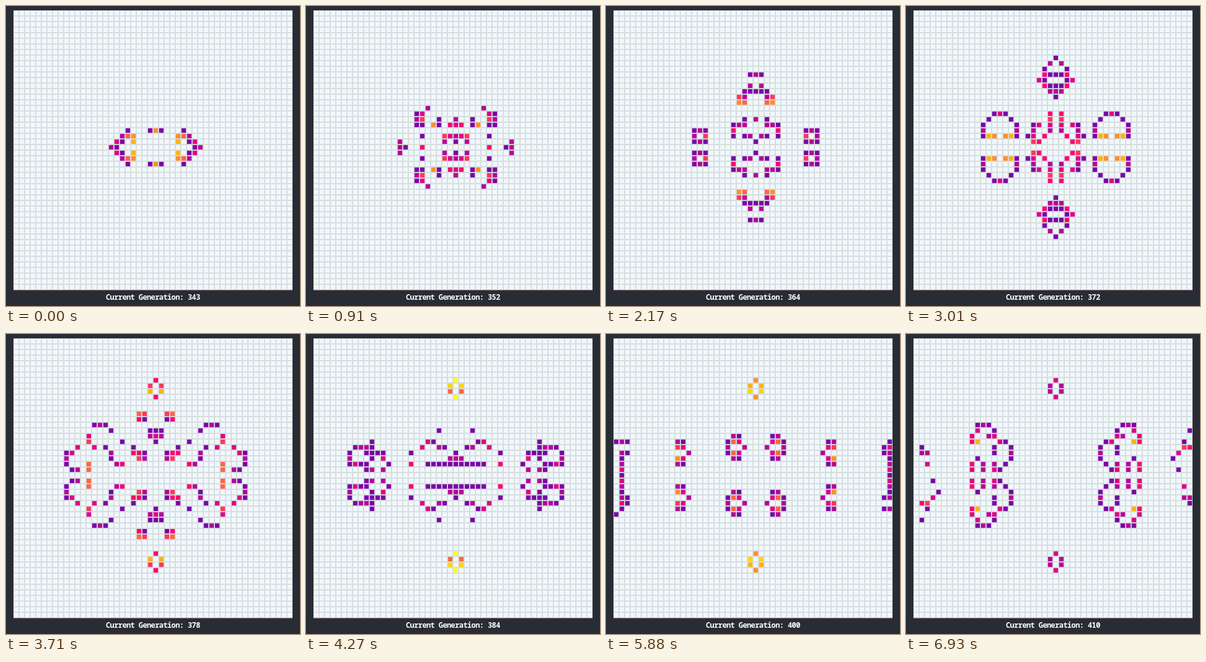
These frames come from a looping animation (474x483 px, 7 s). An HTML page with a canvas:

```html
<!DOCTYPE html>
<html lang="en">
<head>
<meta charset="utf-8">
<title>Game of Life</title>
<style>
  html, body { margin: 0; width: 100%; height: 100%; overflow: hidden; background: #282c34; }
  canvas { position: absolute; left: 0; top: 0; }
  #label {
    position: absolute; left: 161px; top: 461px;
    font: 700 12px/16px "Noto Sans Mono", "DejaVu Sans Mono", monospace;
    letter-spacing: -0.6px; white-space: pre; color: #fff;
  }
</style>
</head>
<body>
<canvas id="board" width="474" height="483"></canvas>
<div id="label">Current Generation: <span id="count">343</span></div>
<script>
const SIZE = 50, CELL = 9, LEFT = 12, TOP = 7;
const FIRST = 343, STEPS = 68, TICK = 70, LOOP = 7000;
const PALETTE = ['#7b00a9', '#b8009a', '#e00086', '#ff006f', '#ff385b',
                 '#ff6644', '#ff8f2b', '#ffb30a', '#ffd500', '#fbff2b'];

// One quadrant of the starting pattern: [dx, dy, age], mirrored about (25, 24)
const SEED = [
  [7, 0, 0], [8, 0, 1],
  [4, 1, 7], [6, 1, 0], [7, 1, 2],
  [4, 2, 6], [5, 2, 5], [6, 2, 1],
  [0, 3, 6], [1, 3, 0], [5, 3, 0]
];

function seedBoard() {
  const ages = new Int16Array(SIZE * SIZE).fill(-1);
  for (const [dx, dy, age] of SEED)
    for (const sx of [-1, 1])
      for (const sy of [-1, 1])
        ages[(24 + sy * dy) * SIZE + 25 + sx * dx] = age;
  return ages;
}

// Neighbours are taken on the flat array, so row ends run into the next row
const AROUND = [-SIZE - 1, -SIZE, -SIZE + 1, -1, 1, SIZE - 1, SIZE, SIZE + 1];

function evolve(ages) {
  return ages.map((age, i) => {
    let n = 0;
    for (const d of AROUND) if (ages[i + d] >= 0) n++;
    return n === 3 || (n === 2 && age >= 0) ? age + 1 : -1;
  });
}

// Steps alternate between one and two ticks; the rhythm slips at a few points
function isLong(k) {
  const even = k < 4 || (k > 48 && k < 56);
  return k % 2 === (even ? 0 : 1);
}

const boards = [seedBoard()], starts = [0];
for (let k = 1; k < STEPS; k++) {
  boards.push(evolve(boards[k - 1]));
  starts.push(starts[k - 1] + (isLong(k - 1) ? 2 : 1) * TICK);
}

// Colours run up the palette and back down again
function colorOf(age) {
  const m = age % 19;
  return PALETTE[m < 10 ? m : 18 - m];
}

const ctx = document.getElementById('board').getContext('2d');
const count = document.getElementById('count');

function rect(color, x, y, w, h) {
  ctx.fillStyle = color;
  ctx.fillRect(x, y, w, h);
}

function drawGrid() {
  const span = SIZE * CELL;
  rect('#282c34', 0, 0, 474, 483);
  rect('#f0f8ff', LEFT, TOP, span, span);
  for (let i = 0; i < SIZE; i++) {
    const x = LEFT + i * CELL, y = TOP + i * CELL;
    for (const o of [0, CELL - 1]) {
      rect('#d7dedb', LEFT, y + o, span, 1);
      rect('#d9dde0', x + o, TOP, 1, span);
    }
  }
  rect('#9c6870', LEFT, TOP + span, span, 1);
}

function draw(k) {
  drawGrid();
  boards[k].forEach((age, i) => {
    if (age < 0) return;
    const x = LEFT + (i % SIZE) * CELL, y = TOP + Math.floor(i / SIZE) * CELL;
    const color = colorOf(age);
    ctx.globalAlpha = 0.1;
    rect(color, x, y, CELL, CELL);
    ctx.globalAlpha = 1;
    rect(color, x + 1, y + 1, CELL - 2, CELL - 2);
  });
  count.textContent = FIRST + k;
}

let shown = -1;
const origin = performance.now();

function frame() {
  const t = (performance.now() - origin) % LOOP;
  let k = STEPS - 1;
  while (starts[k] > t) k--;
  if (k !== shown) draw(shown = k);
  requestAnimationFrame(frame);
}
frame();
</script>
</body>
</html>
```
